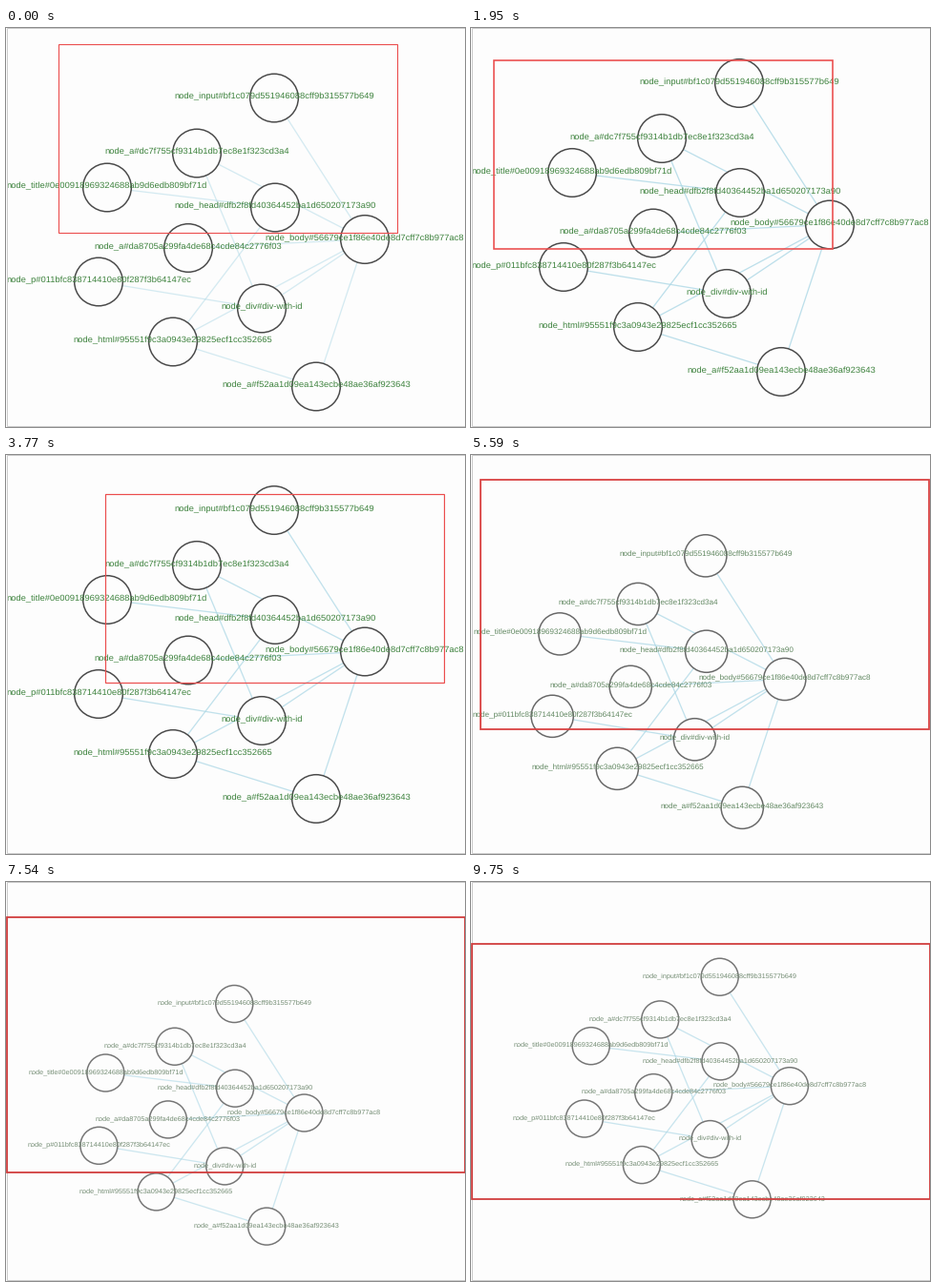
These frames come from a looping animation (481x419 px, 9880 ms). A matplotlib script:

```python
import matplotlib.pyplot as plt
import numpy as np
from matplotlib.animation import FuncAnimation
from matplotlib.patches import Circle, Rectangle

W, H, DPI = 481, 419, 100
FRAMES, STEP = 76, 130
PT = 72 / DPI
RADIUS, FONT_PX, ASPECT = 25.3, 9.35, 0.5585

# key: (x, y, label, offset while the layout is pulled apart), in paint order
NODES = {
    "html": (175, 314, "node_html#95551f9c3a0943e29825ecf1cc352665", (1, -2)),
    "head": (282, 173, "node_head#dfb2f8fd40364452ba1d650207173a90", (17, -37)),
    "title": (106, 152, "node_title#0e00918969324688ab9d6edb809bf71d", (6, -2)),
    "body": (376, 206.5, "node_body#56679ce1f86e40de8d7cff7c8b977ac8", (-7, -3)),
    "div": (268, 279, "node_div#div-with-id", (2, 0)),
    "p": (97, 251, "node_p#011bfc838714410e80f287f3b64147ec", (0, -3)),
    "a1": (200, 116, "node_a#dc7f755cf9314b1db7ec8e1f323cd3a4", (5, -3)),
    "a2": (191, 215.5, "node_a#da8705a299fa4de68c4cde84c2776f03", (2, -3)),
    "a3": (325, 361, "node_a#f52aa1d09ea143ecbe48ae36af923643", (-1, 2)),
    "input": (281, 58, "node_input#bf1c079d551946088cff9b315577b649", (-8, -17)),
}
EDGES = [("html", "head"), ("html", "body"), ("head", "title"), ("body", "div"),
         ("div", "p"), ("div", "a1"), ("body", "a1"), ("body", "a2"),
         ("body", "a3"), ("html", "a3"), ("body", "input")]

# frame, x, y, width
VIEW = [(2, 55, 17, 355), (10, 30, 17, 355), (15, 24, 34, 355), (18, 24, 36, 355),
        (24, 84, 40, 355), (26, 84, 40, 355), (29, 104, 41, 355), (30, 104, 41, 355),
        (32, 70, 35, 355), (34, 70, 35, 355), (35, 40, 20, 410), (37, 40, 20, 410),
        (38, 9, 25, 471), (43, 10, 26, 470), (44, 10, 26, 470), (47, 0.5, 35, 480),
        (52, 0.5, 35, 480), (58, 0.5, 37, 480), (61, 0.5, 37, 480),
        (68, 0.5, 67, 480), (75, 0.5, 65, 480)]
# frame, scale, shift x, shift y
CAMERA = [(10, 1, 0, 15.5), (15, 1, 0, 0), (30, 1, 0, 0), (32, 1, 0, 6), (34, 1, 0, 6),
          (35, 0.935, 0, 38.5), (37, 0.935, 0, 38.5), (38, 0.873, 0.5, 55.2),
          (44, 0.873, 0.5, 55.2), (47, 0.771, 22.6, 83.3), (61, 0.771, 22.6, 83.3),
          (68, 0.771, 44, 55)]
PULL = [(45, 0), (52, 1), (55, 0.35), (58, 0)]
# frame, edge opacity, fade of ink toward grey, view line width
LOOK = [(2, 0.5, 0, 1.1), (15, 0.8, 0, 1.6), (29, 0.75, 0, 1.2), (37, 0.75, 0.2, 1.4),
        (43, 0.75, 0.7, 1.8), (52, 0.5, 1, 1.8), (58, 0.6, 1, 1.8), (75, 0.65, 1, 1.8)]


def at(keys, i):
    cols = np.array(keys, float).T
    return [float(np.interp(i, cols[0], c)) for c in cols[1:]]


def blend(a, b, t):
    return tuple(np.array(a) * (1 - t) + np.array(b) * t)


plt.rcParams["font.family"] = "Liberation Sans"
plt.rcParams["text.hinting"] = "none"
# the small surplus keeps the pixel size from being rounded down
fig = plt.figure(figsize=((W + 0.01) / DPI, (H + 0.01) / DPI), dpi=DPI,
                 facecolor="#fdfdfd")
ax = fig.add_axes([0, 0, 1, 1])
ax.set_xlim(0, W)
ax.set_ylim(H, 0)
ax.axis("off")

lines = [ax.plot([], [], color="#add8e6", lw=1.3 * PT, zorder=1)[0] for _ in EDGES]
circles, labels = {}, {}
for k, (name, (x, y, text, _)) in enumerate(NODES.items()):
    circles[name] = ax.add_patch(Circle((x, y), RADIUS, fc="#fdfdfd", zorder=2 + k))
    labels[name] = ax.text(x, y, text, ha="center", va="baseline", zorder=2.5 + k)
view = ax.add_patch(Rectangle((0, 0), 1, 1, fill=False, zorder=20))
ax.add_patch(Rectangle((0.5, 0.5), W - 1, H - 1, fill=False, ec="#cccccc",
                       lw=PT, zorder=19))


def update(i):
    scale, dx, dy = at(CAMERA, i)
    pull, = at(PULL, i)
    opacity, fade, width = at(LOOK, i)
    ink = blend((0.24, 0.51, 0.24), (0.45, 0.55, 0.45), fade)
    rim = blend((0.29, 0.29, 0.29), (0.46, 0.46, 0.46), fade)

    pos = {}
    for name, (x, y, _, (ox, oy)) in NODES.items():
        px, py = x * scale + dx + ox * pull, y * scale + dy + oy * pull
        pos[name] = px, py
        circles[name].set(center=(px, py), radius=RADIUS * scale,
                          edgecolor=rim, linewidth=1.5 * PT)
        labels[name].set(position=(px, py + 0.8), color=ink,
                         fontsize=FONT_PX * scale * PT)
    for line, (a, b) in zip(lines, EDGES):
        line.set_data(*zip(pos[a], pos[b]))
        line.set_alpha(opacity)

    x, y, w = at(VIEW, i)
    view.set_bounds(x, y, w, w * ASPECT)
    view.set(linewidth=width * PT,
             edgecolor=blend((0.92, 0.3, 0.3), (0.82, 0.24, 0.24), fade))
    return []


anim = FuncAnimation(fig, update, frames=FRAMES, interval=STEP, repeat=True,
                     repeat_delay=0, blit=False)
plt.show()
```
